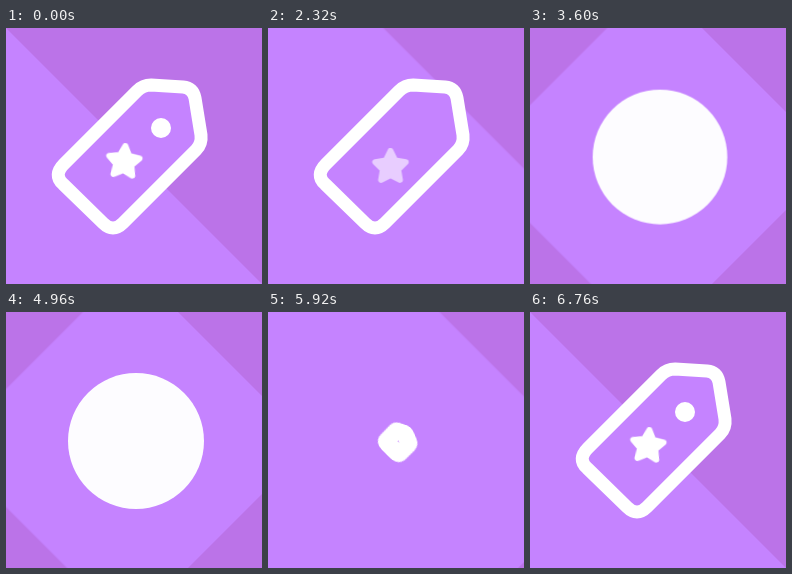
Recreate the animation shown at these times as an HTML page without scripts. Size 256x256 px, loop 8320 ms.

```html
<!DOCTYPE html>
<html lang="en">
<head>
<meta charset="utf-8">
<title>Tag loop</title>
<style>
  html, body { margin: 0; width: 100%; height: 100%; overflow: hidden; background: #c583ff; }
  svg { display: block; width: 100vw; height: 100vh; }
  .corner { fill: #bb73e8; }
  .corner, .tag, .star, .eyelet, .disc { animation: 8.32s linear infinite; }

  .tr { animation-name: tr; }
  .tl { animation-name: tl; }
  .br { animation-name: br; }
  .bl { animation-name: bl; }
  .tag {
    --full: rotate(-45deg) scale(1, 1) rotate(45deg);
    --blob: rotate(-45deg) scale(.12, .217) rotate(45deg);
    fill: #c583ff; stroke: #fff; stroke-width: 13; stroke-linejoin: round;
    vector-effect: non-scaling-stroke;
    transform-origin: 131px 131px; animation-name: tag;
  }
  .star {
    fill: #fff; stroke: #fff; stroke-width: 6; stroke-linejoin: round;
    animation-name: star;
  }
  .eyelet { fill: #fff; transform-origin: 155px 100px; animation-name: eyelet; }
  .disc { fill: #fdfcff; transform-origin: 130px 130px; animation-name: disc; }

  /* Background corners slide along their diagonals */
  @keyframes tr {
    0%, 22.6% { transform: translate(0, 0); animation-timing-function: cubic-bezier(.45, 0, .75, .7); }
    27.88% { transform: translate(57.5px, -57.5px); animation-timing-function: ease-out; }
    32.69% { transform: translate(87px, -87px); }
    36.54% { transform: translate(87px, -87px); animation-timing-function: ease-out; }
    43.27%, 59.62% { transform: translate(86px, -86px); }
    71.15% { transform: translate(85.7px, -85.7px); animation-timing-function: cubic-bezier(.45, 0, .2, 1); }
    79.33%, 100% { transform: translate(0, 0); }
  }
  @keyframes tl {
    0%, 32.69% { transform: translate(-2px, -2px); animation-timing-function: ease-out; }
    36.54% { transform: translate(32px, 32px); animation-timing-function: ease-out; }
    43.27%, 59.62% { transform: translate(38.5px, 38.5px); animation-timing-function: ease-in-out; }
    69.23%, 100% { transform: translate(-2px, -2px); }
  }
  @keyframes br {
    0%, 33.17% { transform: translate(2px, 2px); animation-timing-function: ease-out; }
    36.54% { transform: translate(-32px, -32px); animation-timing-function: ease-out; }
    43.27%, 59.62% { transform: translate(-37px, -37px); animation-timing-function: ease-in-out; }
    71.15% { transform: translate(-3px, -3px); }
    72%, 100% { transform: translate(2px, 2px); }
  }
  @keyframes bl {
    0%, 33.65% { transform: translate(-2px, 2px); animation-timing-function: ease-out; }
    36.54% { transform: translate(25px, -25px); animation-timing-function: ease-out; }
    43.27%, 59.62% { transform: translate(30.5px, -30.5px); animation-timing-function: ease-in-out; }
    69.23%, 100% { transform: translate(-2px, 2px); }
  }

  /* The tag collapses to a round blob, the disc takes over, and back again */
  @keyframes tag {
    0%, 27.88% { transform: var(--full); stroke-width: 13; opacity: 1; animation-timing-function: ease-in; }
    33.17% { transform: var(--blob); stroke-width: 17; opacity: 1; }
    33.18%, 70.9% { transform: var(--blob); stroke-width: 17; opacity: 0; }
    70.91%, 71.15% { transform: var(--blob); stroke-width: 17; opacity: 1; animation-timing-function: ease-in-out; }
    76% { transform: rotate(-45deg) scale(1.03, 1.03) rotate(45deg); stroke-width: 13; animation-timing-function: ease-in-out; }
    79.33%, 100% { transform: var(--full); stroke-width: 13; opacity: 1; }
  }
  @keyframes disc {
    0%, 33.17% { transform: scale(.26); opacity: 0; }
    33.18% { transform: scale(.26); opacity: 1; animation-timing-function: ease-out; }
    36.54% { transform: scale(.8); animation-timing-function: ease-out; }
    43.27% { transform: scale(.99); animation-timing-function: ease-out; }
    45.67%, 59.62% { transform: scale(1); animation-timing-function: ease-in-out; }
    70.9% { transform: scale(.26); opacity: 1; }
    70.91%, 100% { transform: scale(.26); opacity: 0; }
  }

  @keyframes star {
    0%, 22.6% { transform: translate(118px, 134px) rotate(5deg); opacity: 1; }
    23.08%, 24% { transform: translate(116.5px, 130.5px) rotate(10deg); opacity: 1; animation-timing-function: ease-in-out; }
    27.88% { transform: translate(122.5px, 139px) rotate(0deg); opacity: .6; }
    29.81% { transform: translate(126px, 135px) rotate(-8deg); opacity: 0; }
    29.82%, 75% { transform: translate(126px, 130px) rotate(-40deg) scale(.4); opacity: 0; animation-timing-function: ease-out; }
    79.33% { transform: translate(118px, 132px) rotate(10deg) scale(1.06); opacity: 1; animation-timing-function: ease-in-out; }
    81.25%, 100% { transform: translate(118px, 134px) rotate(5deg); opacity: 1; }
  }
  @keyframes eyelet {
    0%, 24% { transform: scale(1); animation-timing-function: ease-in; }
    27.4%, 75% { transform: scale(0); animation-timing-function: ease-out; }
    79.33%, 100% { transform: scale(1); }
  }
</style>
</head>
<body>
<svg viewBox="0 0 256 256">
  <rect width="256" height="256" fill="#c583ff"/>
  <polygon class="corner tr" points="-300,-300 600,600 600,-300"/>
  <polygon class="corner tl" points="-300,300 300,-300 -300,-300"/>
  <polygon class="corner br" points="-44,556 556,-44 556,556"/>
  <polygon class="corner bl" points="-300,-44 300,556 -300,556"/>
  <path class="tag" d="M58 136 L131 63 Q137 57 145 57 L177 59 Q187 60 189 70 L195 107 Q196 116 190 122 L117 195 Q107 205 97 195 L57 156 Q47 147 58 136Z"/>
  <circle class="eyelet" cx="155" cy="100" r="10"/>
  <polygon class="star" points="0,-16 4.7,-6.5 15.2,-4.9 7.6,2.5 9.4,12.9 0,8 -9.4,12.9 -7.6,2.5 -15.2,-4.9 -4.7,-6.5"/>
  <circle class="disc" cx="130" cy="129" r="68"/>
</svg>
</body>
</html>
```
